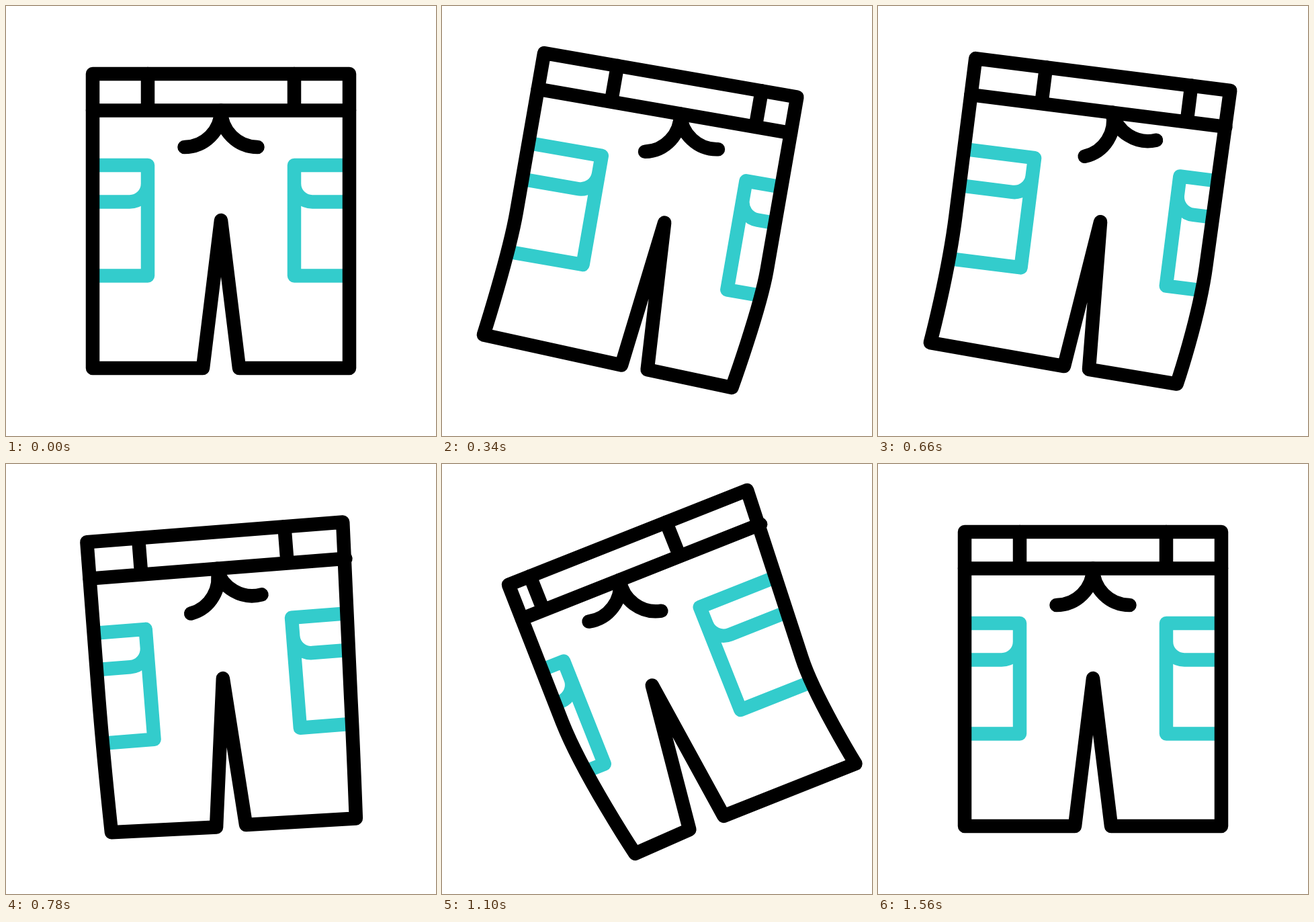
Recreate the animation shown at these times as an HTML page with a canvas. Size 640 px wide and 640 px high, loop 2400 ms.

```html
<!DOCTYPE html>
<html lang="en">
<head>
<meta charset="utf-8">
<title>Swinging shorts</title>
<style>
  html, body { margin: 0; overflow: hidden; background: #fff; }
  canvas { display: block; }
</style>
</head>
<body>
<canvas id="stage" width="640" height="640"></canvas>
<script>
const ctx = document.getElementById('stage').getContext('2d');
const LOOP = 2400, STEP = 20;
const PIVOT = [320, 219];
const RAD = Math.PI / 180;

function ease(k, from, to) {
  const u = Math.min(1, Math.max(0, (k - from) / (to - from)));
  return u * u * (3 - 2 * u);
}

// How much of the right swing and of the left swing applies at step k
function swing(k, start, right, left, end) {
  const a = ease(k, start, right), b = ease(k, right, left), c = ease(k, left, end);
  return [a - b, b - c];
}

const mix = ([r, l], toRight, toLeft) => r * toRight + l * toLeft;

function stroke(path, color) {
  ctx.strokeStyle = color;
  ctx.stroke(path);
}

function outline(w) {
  const at = (x, y, rx, ry, lx, ly) => [x + mix(w, rx, lx), y + mix(w, ry, ly)];
  const path = new Path2D();
  const line = p => path.lineTo(...p);
  const hipL = at(129, 345, 0, -5, -1, -25);
  const bendL = at(129, 345, 0, 85, -1, 63);
  const hemL = at(129, 539, -23.4, -12.8, 28.9, 3.7);
  const hipR = at(511, 355, 0, 10, -17, 9);
  const bendR = at(511, 355, 0, 92, -21, 72);
  const hemR = at(511, 539, -29.6, 6.4, 0, 0);

  path.moveTo(129, 101);
  line(hipL);
  path.bezierCurveTo(...bendL, ...hemL, ...hemL);
  line(at(293, 539, 40, 0, -50, 0));
  line(at(320, 319, 39.7, 0, -49.6, 0));
  line(at(347, 539, 19.5, 0, -49.2, 0));
  line(hemR);
  path.bezierCurveTo(...hemR, ...bendR, ...hipR);
  path.lineTo(511, 101);
  path.closePath();
  return path;
}

// Side pocket; dir points from its inner edge to the seam
function pocket(x, dir) {
  const seam = x + dir * 190;
  return new Path2D(`M${seam} 237H${x}V401.5H${seam}M${seam} 291.5H${x + dir * 27}` +
    `A27 27 0 0 ${dir < 0 ? 0 : 1} ${x} 264.5`);
}

function draw(k) {
  const body = swing(k, 0, 26, 52, 76);
  const cord = swing(k, 4, 29, 55, 78);
  const shift = mix(body, 39.6, -49.7);
  const shape = outline(body);

  ctx.setTransform(1, 0, 0, 1, 0, 0);
  ctx.clearRect(0, 0, 640, 640);
  ctx.lineWidth = 20.5;
  ctx.lineCap = ctx.lineJoin = 'round';
  ctx.translate(...PIVOT);
  ctx.rotate(mix(body, 13.65, -22.6) * RAD);
  ctx.translate(-PIVOT[0], -PIVOT[1]);

  ctx.save();
  ctx.clip(shape);
  stroke(pocket(211 + shift, -1), '#3cc');
  stroke(pocket(429 + shift, 1), '#3cc');
  ctx.restore();

  stroke(shape, '#000');
  stroke(new Path2D(`M129 155.5H511M${211 + shift} 101v54.5M${429 + shift} 101v54.5`), '#000');

  ctx.translate(320 + mix(body, 33.4, -36), 155.5);
  ctx.rotate(mix(cord, -22.2, 13.3) * RAD);
  stroke(new Path2D('M-54.5 54.5A54.5 54.5 0 0 0 0 0A54.5 54.5 0 0 0 54.5 54.5'), '#000');
}

function frame() {
  draw(Math.floor(performance.now() % LOOP / STEP));
  requestAnimationFrame(frame);
}
frame();
</script>
</body>
</html>
```
